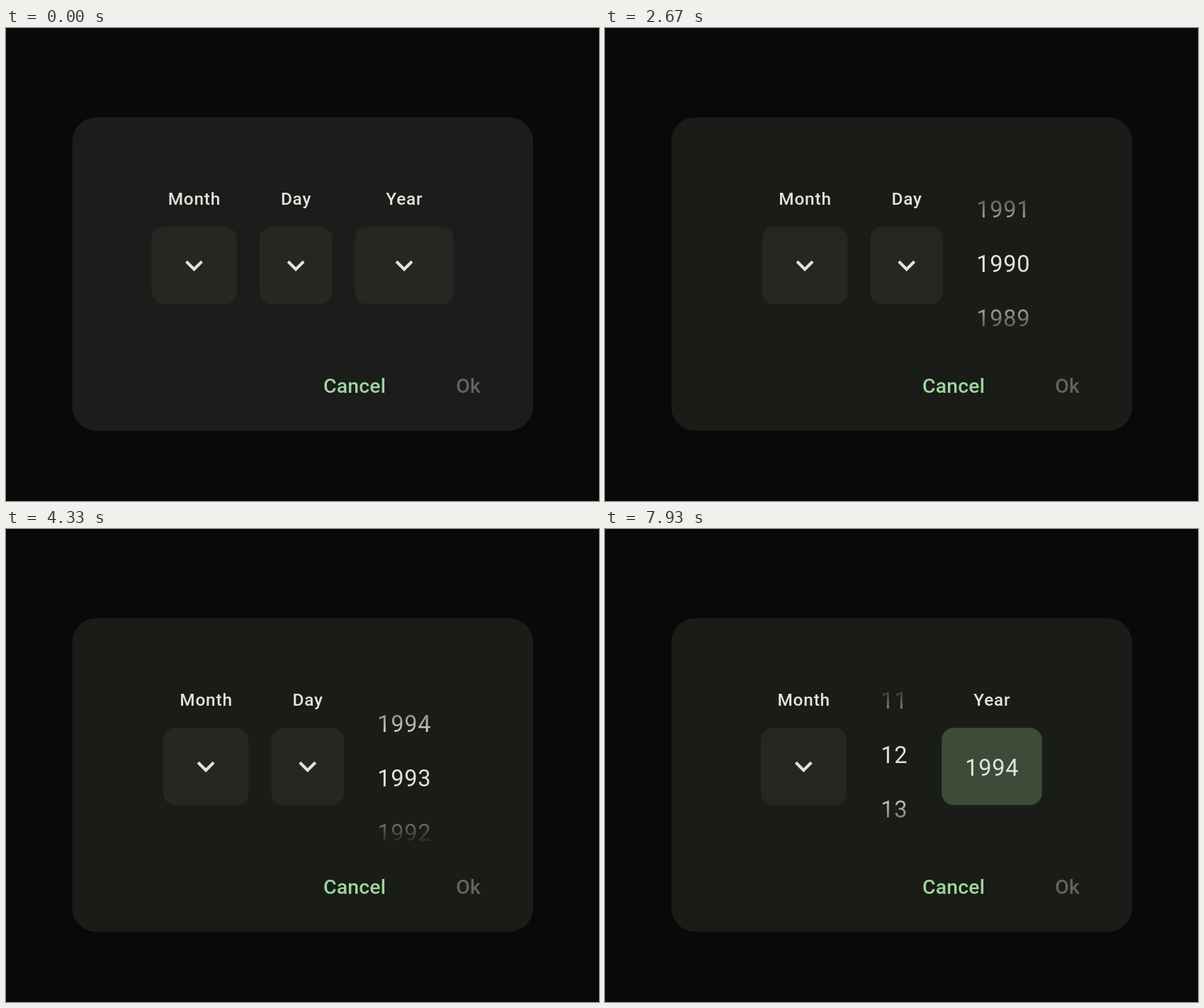
An HTML page with a canvas for the animation above (8 s loop, 837x669 px).

```html
<!DOCTYPE html>
<html lang="en">
<head>
<meta charset="utf-8">
<title>Date picker</title>
<style>
  html, body { margin: 0; width: 100%; height: 100%; overflow: hidden; background: #09090b; }
  canvas { display: block; }
</style>
</head>
<body>
<canvas id="stage" width="837" height="669"></canvas>
<script>
const ctx = document.getElementById('stage').getContext('2d');
const LOOP = 8000, STEP = 1000 / 15;
const INK = '#e2e3dd', CLEAR_INK = '#e2e3dd00';
const MIDDLE_X = 418.4, GAP = 32;
const ROW = 76.67, WHEEL_Y = 333, REACH = 1.5 * ROW;
const YEAR_OPEN = 1130, YEAR_CLOSE = 5930, DAY_OPEN = 6930;

const progress = (t, from, to) => Math.min(1, Math.max(0, (t - from) / (to - from)));
const smooth = u => u * u * (3 - 2 * u);
const fling = u => 1 - (1 - u ** 1.2) ** 3.53;

// A long fling up, a drag back, then a slow correction
const yearAt = t => 1973
  + 22 * fling(progress(t, 1795, 3930))
  - 2 * smooth(progress(t, 3930, 4443))
  + smooth(progress(t, 4600, 5330));

const dayAt = t => 16 - 3.82 * progress(t, 7600, 7930) ** 2;

function panel(x, y, w, h, r, color) {
  ctx.fillStyle = color;
  ctx.beginPath();
  ctx.roundRect(x, y, w, h, r);
  ctx.fill();
}

function text(str, x, y, size, weight, spacing, color) {
  ctx.font = `${weight} ${size}px Roboto, sans-serif`;
  ctx.letterSpacing = spacing + 'px';
  ctx.textAlign = 'center';
  ctx.fillStyle = color;
  ctx.fillText(str, x + spacing / 2, y);
}

const number = (n, x, y, color) => text(String(n), x, y, 32.6, 400, 0.7, color);
const button = (label, x, color) => text(label, x, 516, 28.4, 500, 0.15, color);

function chevron(x) {
  ctx.save();
  ctx.translate(x, 336.5);
  ctx.scale(2.07, 2.07);
  ctx.translate(-12, -12.3);
  ctx.fillStyle = INK;
  ctx.fill(new Path2D('M7.41 8.59L12 13.17l4.59-4.58L18 10l-6 6-6-6z'));
  ctx.restore();
}

// Each part of the row has a width and a draw function that takes its centre
function field(label, width, value) {
  return {
    width,
    draw(x) {
      text(label, x, 250.3, 24.4, 500, 0.8, INK);
      panel(x - width / 2, 281.3, width, 109.2, 17, value ? '#3c4c38' : '#262723');
      if (value) number(value, x, 349.3, INK);
      else chevron(x);
    }
  };
}

// direction is +1 when values grow downwards
function wheel(width, value, direction) {
  return {
    width,
    draw(x) {
      const ink = ctx.createLinearGradient(0, WHEEL_Y - REACH, 0, WHEEL_Y + REACH);
      ink.addColorStop(0, CLEAR_INK);
      ink.addColorStop(1 / 3, INK);
      ink.addColorStop(2 / 3, INK);
      ink.addColorStop(1, CLEAR_INK);
      const near = Math.round(value);
      for (let n = near - 2; n <= near + 2; n++) {
        number(n, x, WHEEL_Y + 11.8 + direction * (n - value) * ROW, ink);
      }
    }
  };
}

function row(parts) {
  const total = parts.reduce((sum, p) => sum + p.width + GAP, -GAP);
  let x = MIDDLE_X - total / 2;
  for (const part of parts) {
    part.draw(x + part.width / 2);
    x += part.width + GAP;
  }
}

function draw(t) {
  ctx.fillStyle = '#09090b';
  ctx.fillRect(0, 0, 837, 669);
  panel(93.5, 126.2, 650.5, 443.5, 34, t < YEAR_OPEN ? '#1c1c1b' : '#1a1c18');

  const month = field('Month', 120.6);
  const day = t < DAY_OPEN ? field('Day', 102.6) : wheel(70.6, dayAt(t), 1);
  const year = t < YEAR_OPEN ? field('Year', 139.2)
    : t < YEAR_CLOSE ? wheel(106, yearAt(t), -1)
    : field('Year', 141.6, 1994);
  row([month, day, year]);

  button('Cancel', 492, '#9dd59c');
  button('Ok', 652.5, '#636361');
}

function tick() {
  const t = performance.now() % LOOP;
  const step = Math.floor((t + 5) / STEP);
  draw(Math.round(step * STEP / 10) * 10 % LOOP);
  requestAnimationFrame(tick);
}
tick();
</script>
</body>
</html>
```
